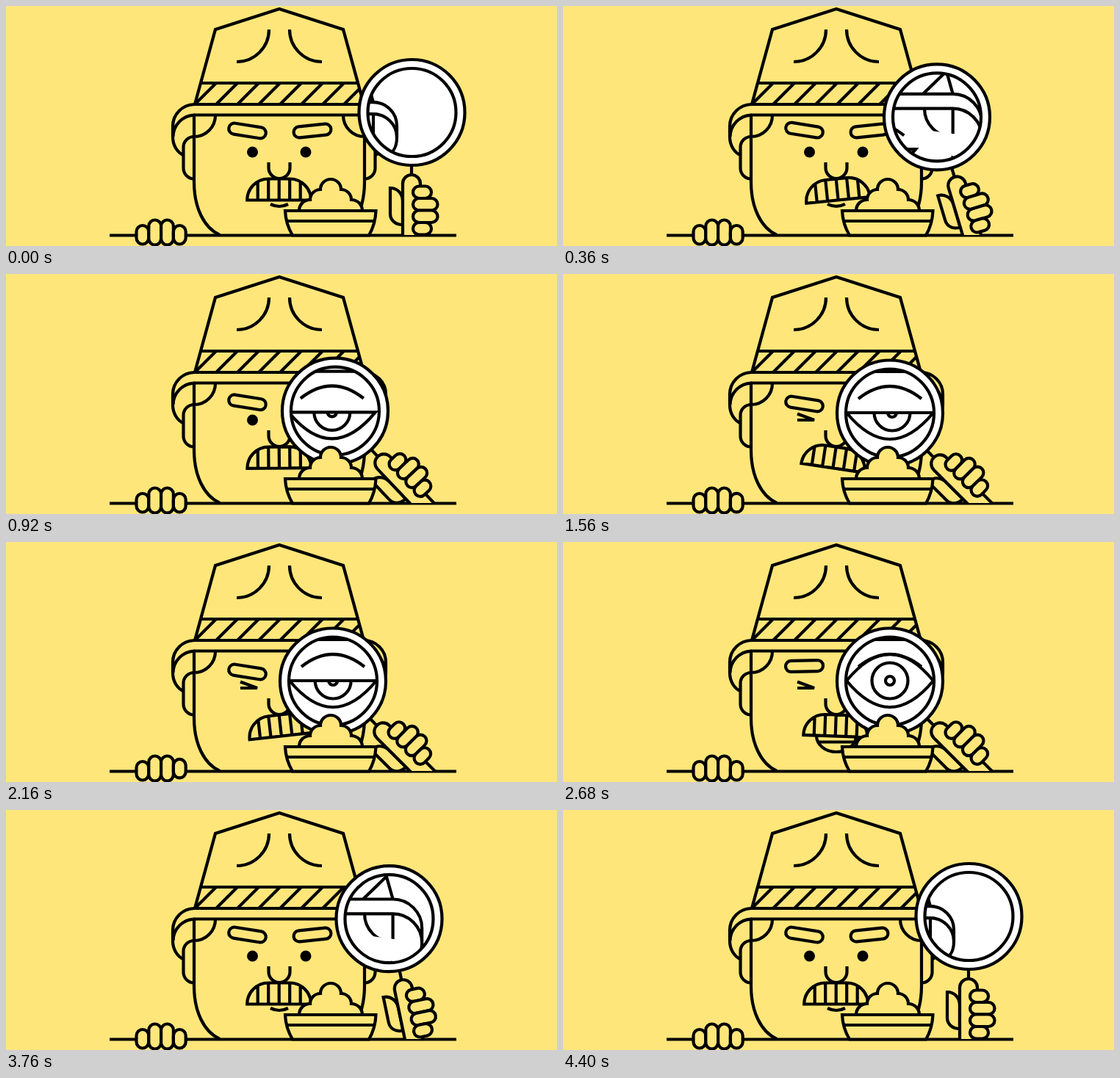
Write an HTML page that moves like this. It is 750 px wide and 327 px high and loops after 4600 ms.

```html
<!DOCTYPE html>
<html lang="en">
<head>
<meta charset="utf-8">
<title>Inspector</title>
<style>
html, body { margin: 0; width: 100%; height: 100%; overflow: hidden; background: #ffe67a }
svg { display: block; width: 750px; height: 327px; fill: none; stroke: #000; stroke-width: 4.2; stroke-linejoin: miter }
.skin { fill: #ffe67a }
.glass { fill: #fff }
.ink { fill: #000; stroke: none }
#view * { vector-effect: non-scaling-stroke }
</style>
</head>
<body>
<svg viewBox="0 0 750 327">
  <defs>
    <clipPath id="aboveTable"><rect width="750" height="312"/></clipPath>
    <clipPath id="lensClip"><circle id="lensHole" r="60"/></clipPath>
    <clipPath id="eyeClip"><path id="eyeHole"/></clipPath>
    <g id="side">
      <path d="M256 178A14.5 14.5 0 0 0 241.500 192V221A14.500 14.500 0 0 0 256 235.500"/>
      <path d="M256 149V240C256 274 269 302 291 312M285 149A29 29 0 0 1 256 178"/>
      <path d="M257 134A30 30 0 0 0 227 164V178C227 190 233 199 241 203M257 148.500A30 30 0 0 0 227.500 178"/>
    </g>
  </defs>

  <use href="#side"/>
  <use href="#side" transform="translate(744) scale(-1 1)"/>
  <path d="M257 134L285 32L372 4L459 32L487 134ZM358 32A44 44 0 0 1 314 76M386 32A44 44 0 0 0 430 76M264 105H480M256 148.500H488"/>
  <path id="stripes"/>

  <rect id="browL" class="skin" x="-25.500" y="-7.500" width="51" height="15" rx="7.500"/>
  <rect class="skin" x="-25.500" y="-7.500" width="51" height="15" rx="7.500" transform="translate(417 170) rotate(-6)"/>
  <circle id="dot" class="ink" cx="335.500" cy="199" r="7.500"/>
  <path id="wink" d="M319 190.500L342 199H319"/>
  <circle class="ink" cx="408" cy="199" r="7.500"/>
  <path d="M357.500 213V220.500A14.500 14.500 0 0 0 386.500 220.500V213"/>
  <path id="mouth" class="skin"/>
  <path id="moustache" class="skin" d="M-43.500 14.500A29 29 0 0 1 -14.500 -14.500H14.500A29 29 0 0 1 43.500 14.500ZM-29 -10V14M-14.500 -14V14M0 -14V14M14.500 -14V14M29 -10V14"/>
  <path d="M141 312.500H613"/>

  <g clip-path="url(#aboveTable)">
    <g id="arm">
      <path d="M552 216V232"/>
      <path class="skin" d="M523 248V283C523 292 530 298 540 298V266C540 256 533 248 523 248Z"/>
      <path class="skin" d="M540 350V242A12 12 0 0 1 564 242V350"/>
      <g class="skin">
        <rect x="554" y="245.500" width="25" height="16.500" rx="8.200"/>
        <rect x="554" y="262" width="33.500" height="16.500" rx="8.200"/>
        <rect x="554" y="278.500" width="33.500" height="16.500" rx="8.200"/>
        <rect x="554" y="295" width="25" height="16.500" rx="8.200"/>
      </g>
    </g>
  </g>

  <circle id="ring" class="glass" r="72"/>
  <g clip-path="url(#lensClip)">
    <g id="view">
      <path d="M110 -56V30M71 -56A39 39 0 0 0 110 -17A20 20 0 0 1 130 3V30"/>
      <path class="glass" d="M-150 -76H110A40 40 0 0 1 150 -36V-16C150 0 143 12 130 16M150 -16A40 40 0 0 0 110 -56H-150"/>
      <path d="M110 -76L101 -108M69 -76L102 -108"/>
      <path d="M-43 -19Q0 -53 43 -19"/>
      <path id="eye"/>
      <g clip-path="url(#eyeClip)">
        <g id="iris"><circle r="24.500"/><circle r="6"/></g>
      </g>
    </g>
  </g>
  <circle id="rim" r="60"/>

  <path class="skin" d="M399 279C399 270 406 264 414 264A14 14 0 0 1 428 250A14 14 0 0 1 456 250A14 14 0 0 1 470 264C478 264 485 270 485 279Z"/>
  <path class="skin" d="M380 279H503.500C503 292 499 304 494 312.500H390C385 304 380.500 292 380 279ZM382 293H502"/>
  <g id="fingers" class="skin">
    <rect x="177.500" y="299" width="16.800" height="25.500" rx="8.400"/>
    <rect x="194.300" y="291.500" width="16.800" height="34" rx="8.400"/>
    <rect x="211.100" y="291.500" width="16.800" height="34" rx="8.400"/>
    <rect x="227.900" y="299" width="16.800" height="25.500" rx="8.400"/>
  </g>
</svg>
<script>
const LOOP = 4600;
const $ = id => document.getElementById(id);
const set = (id, name, value) => $(id).setAttribute(name, value);
const smooth = u => u * u * (3 - 2 * u);
const clamp = u => Math.max(0, Math.min(1, u));

// Interpolates [position, value] pairs.
function track(keys, at, ease = smooth) {
  let prev = keys[0];
  for (const key of keys) {
    if (at <= key[0]) {
      const u = key[0] > prev[0] ? clamp((at - prev[0]) / (key[0] - prev[0])) : 1;
      return prev[1] + (key[1] - prev[1]) * ease(u);
    }
    prev = key;
  }
  return prev[1];
}

// cubic-bezier(x1, 0, x2, 1)
function bezier(x1, x2, u) {
  let lo = 0, hi = 1;
  for (let i = 0; i < 24; i++) {
    const s = (lo + hi) / 2, r = 1 - s;
    if (3 * x1 * r * r * s + 3 * x2 * r * s * s + s ** 3 < u) lo = s; else hi = s;
  }
  return smooth(lo);
}

const linear = u => u;
const sway = [[100, 0], [520, -8.5], [620, -8], [920, -.5], [1440, 9], [1560, 8.5], [2240, -7], [2680, 2], [3000, 0]];
const browY = [[0, 170], [600, 168.7], [920, 174.8], [1560, 177], [2240, 177], [2640, 169], [3400, 169], [3680, 170]];
const browTurn = [[0, 9], [2240, 9], [2640, -1.5], [3400, -1.5], [3680, 9]];
const jaw = [[2300, 0], [2680, 22], [3000, 29], [3400, 29], [3640, 0]];
const lip = [[300, 0], [600, -2], [900, -10], [3400, -10], [3700, 0]];
const lid = [[2260, 0], [2660, 72], [3400, 72], [3700, 0]];
const gaze = [[1160, 0], [1560, 3], [1720, 3], [2240, 0]];
// What the glass shows, by tilt of the handle.
const viewX = [[0, 412], [12.4, 418], [35.5, 438], [43.7, 444], [45, 445]];
const viewY = [[0, 192], [12.4, 197], [35.5, 187], [43.7, 188.5], [45, 189]];
const viewScale = [[0, .8], [12.4, 1], [35.5, .95], [43.7, 1]];

let stripes = 'M460 134L481 113';
for (let x = 257; x < 450; x += 29) stripes += `M${x} 134l29 -29`;
set('stripes', 'd', stripes);

function drawFace(t) {
  const turn = track(sway, t), open = track(jaw, t);
  set('moustache', 'transform', `translate(${371.7 - turn * .25} 250) rotate(${turn})`);
  set('browL', 'transform', `translate(328.500 ${track(browY, t)}) rotate(${track(browTurn, t)})`);

  let mouth = `M360 ${270 + track(lip, t)}q12 6 24 0`;
  if (open > .5) {
    mouth = `M345 264A27 ${open} 0 0 0 399 264`;
    if (open > 9) {
      const half = 27 * Math.sqrt(1 - (8.5 / open) ** 2);
      mouth += `M${372 - half} 272.500h${2 * half}`;
    }
  }
  set('mouth', 'd', mouth);

  const winking = t >= 1240 && t < 3520;
  set('dot', 'visibility', winking ? 'hidden' : 'visible');
  set('wink', 'visibility', winking ? 'visible' : 'hidden');
}

function drawLens(t) {
  const swing = t < 3400 ? bezier(.4, .2, clamp(t / 1200)) : 1 - bezier(.2, .05, clamp((t - 3400) / 1000));
  const tilt = 45 * swing, a = tilt * Math.PI / 180;
  set('arm', 'transform', `rotate(${-tilt} 552.500 297)`);
  for (const id of ['ring', 'rim', 'lensHole']) {
    set(id, 'cx', 552.5 - 152 * Math.sin(a));
    set(id, 'cy', 297 - 152 * Math.cos(a));
  }
  const [x, y, s] = [viewX, viewY, viewScale].map(keys => track(keys, tilt, linear));
  set('view', 'transform', `translate(${x} ${y}) scale(${s})`);

  const eye = `M-59 0Q0 ${-track(lid, t)} 59 0Q0 72 -59 0Z`;
  set('eye', 'd', eye);
  set('eyeHole', 'd', eye);
  set('iris', 'transform', `translate(${track(gaze, t)})`);
}

// Three waves of tapping, starting with the rightmost finger.
function drawFingers(t) {
  [...$('fingers').children].forEach((finger, i) => {
    let lift = 0;
    for (let k = 0; k < 3; k++) {
      const u = clamp((t - 1000 - 560 * k - 80 * (3 - i)) / 240);
      lift += 6 * Math.sin(Math.PI * u);
    }
    finger.setAttribute('transform', `translate(0 ${-lift})`);
  });
}

function draw(now) {
  const t = now % LOOP;
  drawFace(t);
  drawLens(t);
  drawFingers(t);
}

const start = performance.now();
function tick() {
  draw(performance.now() - start);
  requestAnimationFrame(tick);
}
tick();
</script>
</body>
</html>
```
